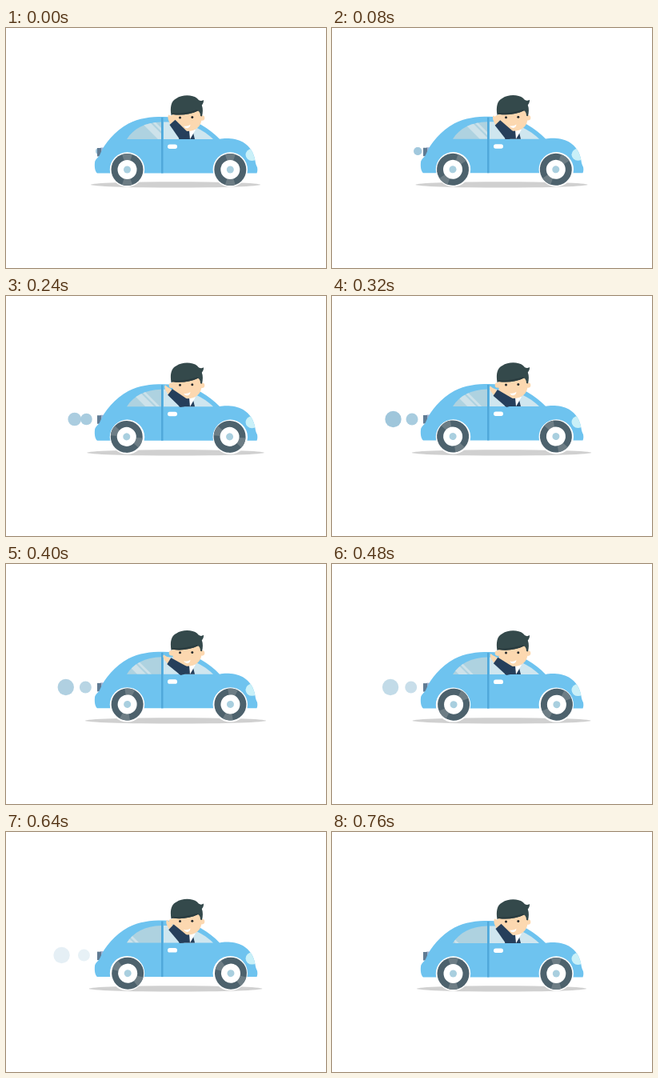
Write an HTML page that moves like this. It is 400 px wide and 300 px high and loops after 0.8 s.

```html
<!DOCTYPE html>
<html lang="en">
<head>
<meta charset="utf-8">
<title>Waving driver</title>
<style>
html, body { margin: 0; width: 100%; height: 100%; overflow: hidden; background: #fff; }
svg { display: block; width: 100vw; height: 100vh; }
</style>
</head>
<body>
<svg viewBox="0 0 400 300">
  <defs>
    <path id="shell" d="M114 180.5C111 178 110.500 172 111 167C111.500 163 115 161.500 117 158
      C123 143 136 128 153 118.500C166 111.500 181 110 196 110C218 110 231 113 244 120
      C253 125 260 131 267 137.800C275 136 288 137 296 141.500C305 147 310 155 311.500 165
      C312 169 313 171 314 173C314.500 176 314.500 178 313.500 180.500Z"/>
    <path id="rear" d="M151 138C159 125 174 117 194 116.500V138Z"/>
    <clipPath id="shellClip"><use href="#shell"/></clipPath>
    <clipPath id="rearClip"><use href="#rear"/></clipPath>
    <g id="wheel">
      <circle r="20" fill="#4d626d"/>
      <path d="M0 0L-6.500-18.900A20 20 0 0 1 6.500-18.900ZM0 0L6.500 18.900A20 20 0 0 1-6.500 18.900Z" fill="#6d7d85"/>
      <circle r="12" fill="#fff"/>
      <circle r="4.500" fill="#a9cfdf"/>
    </g>
  </defs>

  <ellipse id="shadow" cx="212" cy="195.900" rx="106" ry="3.700" fill="#d0d0d0"/>
  <circle id="bigPuff" cy="154" fill="#9fc6db"/>
  <circle id="smallPuff" cy="154" fill="#9fc6db"/>

  <g id="car">
    <path d="M118 148.500H128V159H118Z" fill="#9fb2d4"/>
    <path d="M114 149H119V159.500H114Z" fill="#607b93"/>
    <use href="#shell" fill="#6ec3ef"/>
    <ellipse cx="307.500" cy="157.500" rx="8" ry="7.500" fill="#c9f0f8" clip-path="url(#shellClip)"/>
    <use href="#rear" fill="#aed2e0"/>
    <g clip-path="url(#rearClip)">
      <g id="glint" fill="#cde2ea">
        <path d="M-21 116H-10L12 138H1Z"/>
        <path d="M-7 116H-3L19 138H15Z"/>
      </g>
    </g>
    <path d="M197 116.500C225 116.500 242 122 259 138H197Z" fill="#cfe6ef"/>
    <path d="M194 111H196.500V180.500H194Z" fill="#50a8da"/>
    <rect x="202" y="144.500" width="12" height="5.500" rx="2.700" fill="#fff"/>
    <g fill="#fff"><circle cx="151.500" cy="176" r="21.700"/><circle cx="280.300" cy="176" r="21.700"/></g>

    <path d="M216 138L222 126H233L236 138Z" fill="#263f5b"/>
    <path d="M229 127L237 126L233 133L230 138Z" fill="#fff"/>
    <g fill="#fcd8b0">
      <circle cx="207" cy="111.500" r="3.300"/>
      <circle cx="245" cy="111.500" r="3.300"/>
      <path d="M208 98H244.500V112C244.500 122 237 128 226.500 128C216 128 208 122 208 112Z"/>
    </g>
    <path d="M206.500 108C205 99 206 90 213 87C220 82 233 82 239 87C241 90 244 91 247 89
      C247.300 92 246 94 244.800 95.500C246.500 100 246 105 245 109.500L243 109
      C243 106 242 103.500 240 102.500C231 107 219 108.500 209 107Z" fill="#34494b"/>
    <path d="M208 107C219 108.500 231 107 240 102.500L239 101C230 104 219 106 207 105Z" fill="#2b3d40"/>
    <g fill="#262a2c"><circle cx="217.500" cy="111" r="1.500"/><circle cx="232.800" cy="110.600" r="1.500"/></g>
    <path d="M222 121.500Q227 122.500 230.500 119.800Q230 124 226.500 124.300Q223.500 124.300 222 121.500Z" fill="#fff"/>

    <g id="arm">
      <path d="M210 118L205 119L203 114C202 110 202.500 107.500 204 107.500L206 110L209.500 113Z" fill="#fcd8b0"/>
      <path d="M204.500 120L211.500 113.800L227 129L222 138H217Z" fill="#263f5b"/>
    </g>
  </g>
  <use class="wheel" href="#wheel"/>
  <use class="wheel" href="#wheel"/>
</svg>
<script>
const LOOP = 800, STEP = 40, CYCLE = 760;
const get = id => document.getElementById(id);
const wheels = document.querySelectorAll('.wheel');

// Linear interpolation through [time, value] pairs.
function track(keys, t) {
  const i = keys.findIndex(k => k[0] > t);
  if (i < 0) return keys[keys.length - 1][1];
  const [t0, a] = keys[i - 1], [t1, b] = keys[i];
  return a + (b - a) * (t - t0) / (t1 - t0);
}

const big = {
  x: [[0, 116], [80, 107.5], [160, 95], [320, 76.5], [760, 67]],
  r: [[0, 3], [80, 5], [160, 6.5], [320, 10.2], [760, 10.2]],
  a: [[0, .75], [160, .75], [320, 1], [760, 0]]
};
const small = {
  x: [[0, 116], [80, 107], [160, 101], [320, 100], [760, 96.5]],
  r: [[0, 4], [80, 5], [160, 7], [320, 7.5], [760, 7.5]],
  a: [[0, .9], [320, .9], [760, 0]]
};

function puff(el, p, t) {
  el.setAttribute('cx', track(p.x, t));
  el.setAttribute('r', track(p.r, t));
  el.setAttribute('opacity', track(p.a, t));
}

function draw(t) {
  const u = t / CYCLE, k = 1 - Math.abs(1 - 2 * u), turn = u * 2 * Math.PI;
  const move = (el, v) => el.setAttribute('transform', v);

  get('shadow').setAttribute('rx', 106 + 7.5 * k);
  puff(get('bigPuff'), big, t);
  puff(get('smallPuff'), small, t);
  move(get('car'), `translate(0 ${1 - 1.2 * k})`);
  move(get('arm'), `rotate(${-17 * k} 222 134)`);
  move(get('glint'), `translate(${189 - .065 * t} 0)`);

  // The wheels turn slightly off centre.
  const y = 176.2 + .8 * Math.cos(turn);
  [151.5, 280.3].forEach((x, i) =>
    move(wheels[i], `translate(${x - .8 * Math.sin(turn)} ${y}) rotate(${360 * u})`));
}

const start = performance.now();
function tick() {
  const t = (performance.now() - start) % LOOP;
  draw(Math.floor(t / STEP) * STEP);
  requestAnimationFrame(tick);
}
tick();
</script>
</body>
</html>
```
